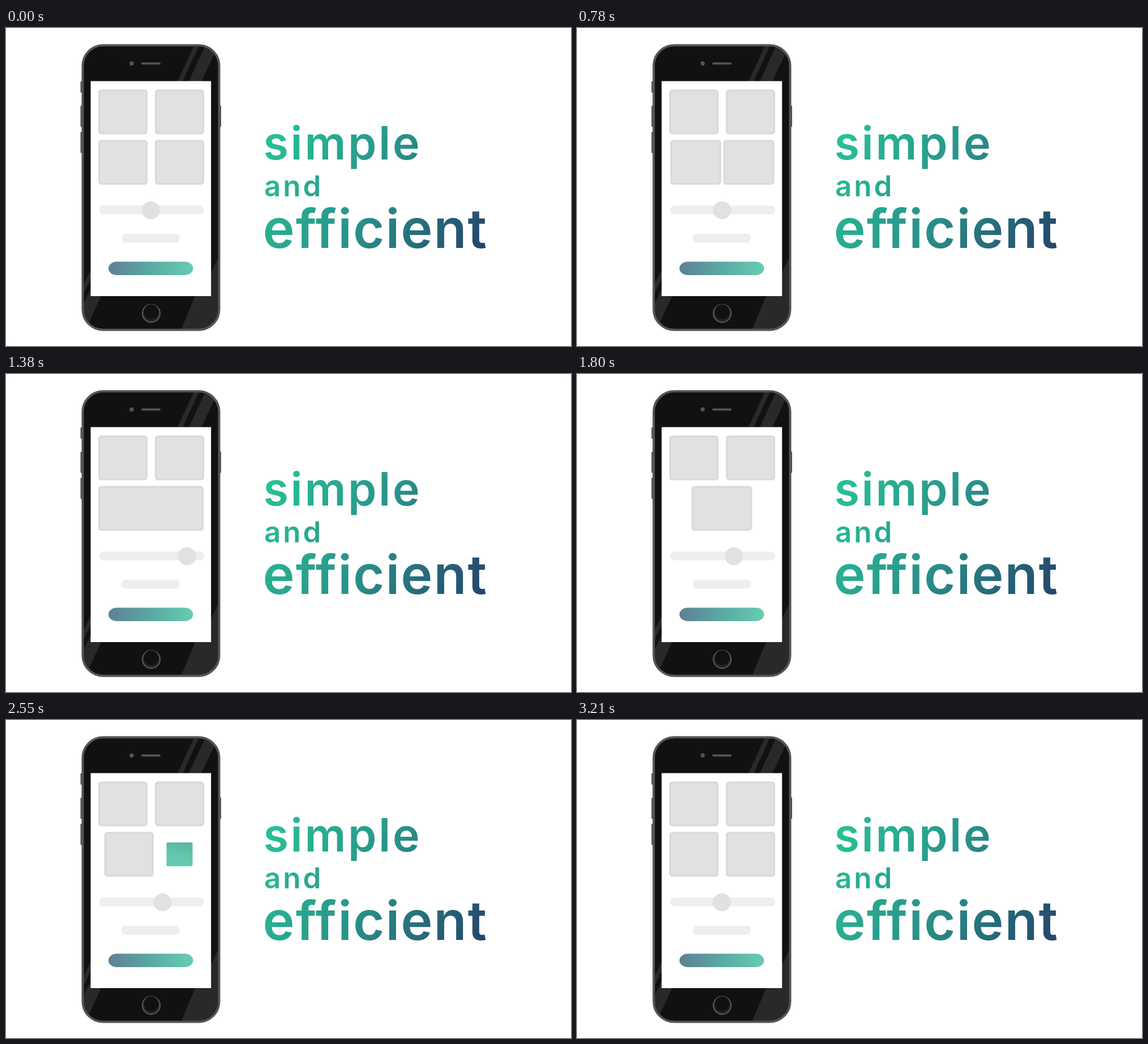
Recreate the animation shown at these times as an HTML page. Size 998x561 px, loop 3540 ms.

```html
<!DOCTYPE html>
<html lang="en">
<head>
<meta charset="utf-8">
<title>Simple and efficient</title>
<style>
  html, body { margin: 0; width: 100%; height: 100%; overflow: hidden; background: #fff; }
  svg { display: block; width: 100vw; height: 100vh; }
  text { font-family: Inter, "Open Sans", sans-serif; font-weight: 600; }
  .tile { fill: #e1e1e1; stroke: #d9d9d9; stroke-width: 3; }
  .soft { fill: #eee; }
  .edge { fill: #555; }
  .shine { fill: #fff; fill-opacity: .1; }
</style>
</head>
<body>
<svg viewBox="0 0 998 561">
  <defs>
    <linearGradient id="ink" gradientUnits="userSpaceOnUse" x1="458" y1="172" x2="855" y2="388">
      <stop offset="0" stop-color="#28c497"/>
      <stop offset=".5" stop-color="#2a9189"/>
      <stop offset="1" stop-color="#24426a"/>
    </linearGradient>
    <linearGradient id="pill">
      <stop offset="0" stop-color="#5f8095"/>
      <stop offset=".5" stop-color="#5aa9a3"/>
      <stop offset="1" stop-color="#66cdb3"/>
    </linearGradient>
    <linearGradient id="mint" x1=".6" y1="0" x2=".4" y2="1">
      <stop offset="0" stop-color="#5cb5a3"/>
      <stop offset=".55" stop-color="#64c7b0"/>
      <stop offset="1" stop-color="#66cbb3"/>
    </linearGradient>
    <clipPath id="body"><rect x="137.5" y="32.5" width="237" height="498" rx="34"/></clipPath>
  </defs>

  <g class="edge">
    <rect x="131.5" y="94" width="5" height="20" rx="1.5"/>
    <rect x="131.5" y="137" width="5" height="37.5" rx="1.5"/>
    <rect x="131.5" y="183" width="5" height="37.5" rx="1.5"/>
    <rect x="375" y="136.500" width="5" height="38" rx="1.5"/>
  </g>
  <rect x="135.500" y="30.500" width="241" height="502" rx="36" fill="#111" stroke="#555" stroke-width="4"/>
  <g class="shine" clip-path="url(#body)">
    <path d="M303 94 333 29H342L312 94zM323 94 353 29H376L345 94z"/>
    <path d="M380 395V540H306L334 473 362 432z"/>
    <path d="M130 466 150 426V442L130 483zM130 500 150 460 168 473 141 531H130z"/>
  </g>
  <circle class="edge" cx="222" cy="62.500" r="3.700"/>
  <rect class="edge" x="239" y="60.700" width="34" height="3.800" rx="1.900"/>
  <circle cx="256.500" cy="503.500" r="15.500" fill="#222" stroke="#555" stroke-width="2.300"/>
  <circle cx="256.500" cy="500.500" r="13" fill="#111"/>
  <rect x="149.500" y="93.700" width="212.700" height="379.300" fill="#fff"/>

  <rect class="tile" x="164.500" y="110" width="84" height="76" rx="4"/>
  <rect class="tile" x="264.500" y="110" width="84" height="76" rx="4"/>
  <rect class="tile" id="left" y="199" height="76" rx="4"/>
  <rect class="tile" id="right" y="199" height="76" rx="4"/>
  <rect id="fresh" x="263" y="197.500" width="87" height="79" rx="4" fill="url(#mint)"/>

  <rect class="soft" x="164.500" y="313.300" width="185.500" height="15.500" rx="7.700"/>
  <circle id="knob" cy="321.500" r="15.800" fill="#e1e1e1"/>
  <rect class="soft" x="204.500" y="363" width="102" height="15.700" rx="6"/>
  <rect x="181" y="412.300" width="149.500" height="23.700" rx="15" ry="11.850" fill="url(#pill)"/>

  <g fill="url(#ink)">
    <text x="454.500" y="231.500" font-size="81" letter-spacing="3.6">simple</text>
    <text x="456" y="297" font-size="51" letter-spacing="4">and</text>
    <text x="453.500" y="388" font-size="95" letter-spacing="2">efficient</text>
  </g>
</svg>
<script>
const LOOP = 3540, STEP = 30;
const $ = id => document.getElementById(id);
const ease = {
  io: p => p < .5 ? 4 * p ** 3 : 1 - 4 * (1 - p) ** 3,
  in: p => p * p,
  out: p => 1 - (1 - p) ** 2
};

// Each row: time, value, easing towards that value
const knobX = [[0, 256], [480, 223, 'io'], [1160, 320, 'io'], [1440, 320], [2190, 223, 'io'], [2760, 290, 'io'], [3210, 256, 'io']];
const leftStart = [[480, 163], [780, 164.7, 'in'], [930, 163, 'out'], [1440, 163], [2010, 212, 'io'], [2190, 212], [2770, 163, 'io']];
const leftEnd = [[480, 250], [780, 254.5, 'in'], [930, 257, 'out']];
const wideEnd = [[1440, 349], [2010, 299.300, 'io'], [2190, 299.300], [2770, 250, 'io']];
const rightStart = [[480, 263], [780, 258.5, 'in'], [930, 256, 'out']];
const rightEnd = [[480, 350], [780, 348.3, 'in'], [930, 349, 'out']];
const freshSize = [[2300, 0], [2790, 1, 'io']];
const freshFade = [[2790, 1], [3210, 0, 'io']];

function at(track, t) {
  const i = track.findIndex(row => row[0] > t);
  if (i < 0) return track[track.length - 1][1];
  if (i === 0) return track[0][1];
  const [t0, a] = track[i - 1], [t1, b, kind = 'io'] = track[i];
  return a + (b - a) * ease[kind]((t - t0) / (t1 - t0));
}

function span(el, x0, x1) {
  el.setAttribute('x', x0 + 1.5);
  el.setAttribute('width', x1 - x0 - 3);
}

function draw(t) {
  const merged = t >= 930;
  const pair = !merged || t >= 2790;
  $('knob').setAttribute('cx', at(knobX, t));
  span($('left'), at(leftStart, t), at(merged ? wideEnd : leftEnd, t));
  if (merged) span($('right'), 263, 350);
  else span($('right'), at(rightStart, t), at(rightEnd, t));
  $('right').style.visibility = pair ? 'visible' : 'hidden';

  const size = at(freshSize, t);
  $('fresh').setAttribute('transform', `translate(306.5 237) scale(${size}) translate(-306.5 -237)`);
  $('fresh').setAttribute('opacity', size > 0 ? at(freshFade, t) : 0);
}

const start = performance.now();
function tick() {
  const t = (performance.now() - start) % LOOP;
  draw(Math.floor(t / STEP) * STEP);
  requestAnimationFrame(tick);
}
tick();
</script>
</body>
</html>
```
